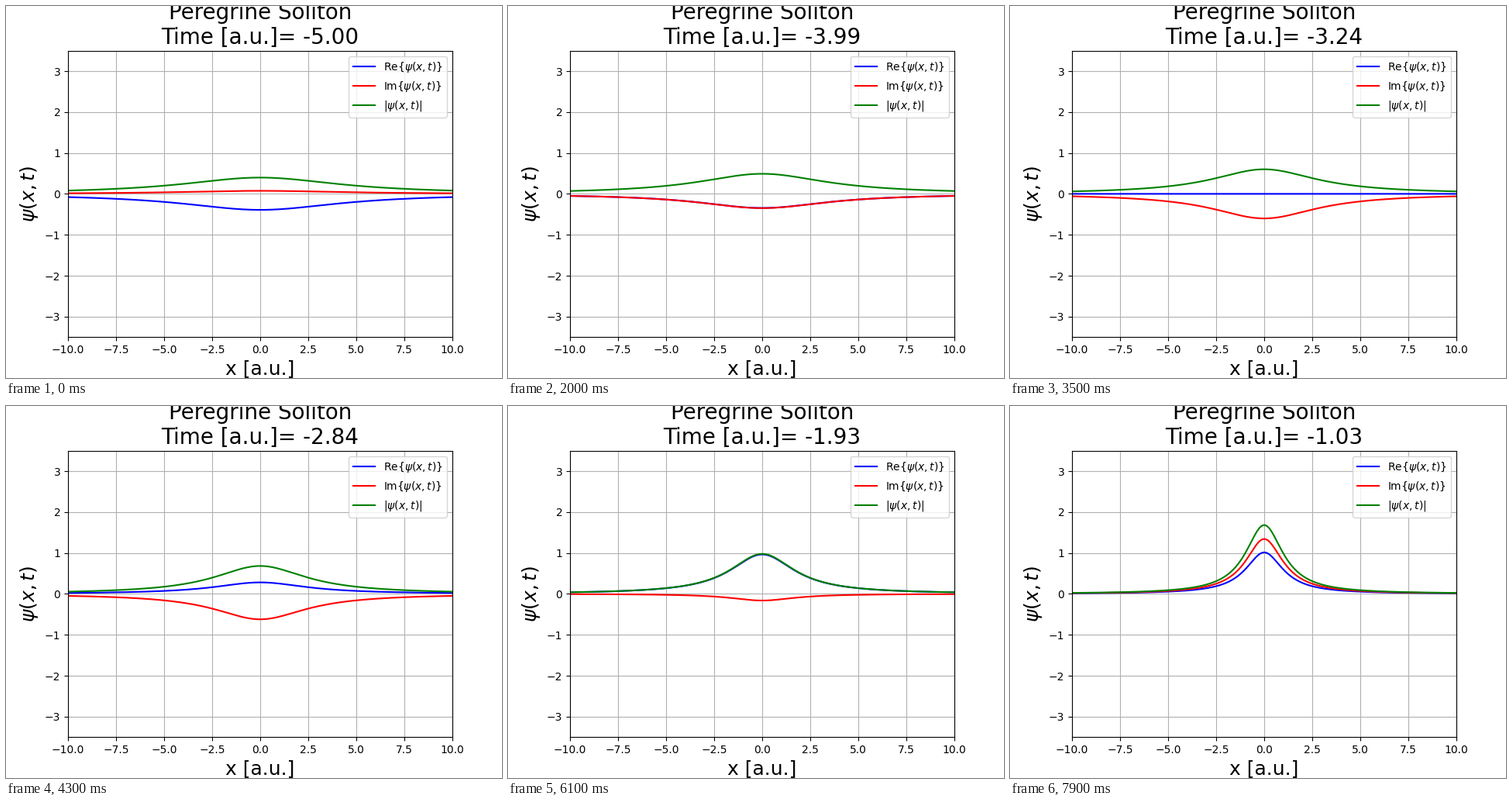
A matplotlib script for the animation above (8 s loop, 640 by 480 pixels).

```python
import numpy as np
import matplotlib.pyplot as plt
from matplotlib.animation import FuncAnimation

FRAMES = 80
times = np.linspace(-5, 5, 200)
x = np.linspace(-10, 10, 400)


def soliton(x, t):
    """Rational part of the Peregrine solution, without the background."""
    return -4 * (1 + 2j * t) / (1 + 4 * x**2 + 4 * t**2) * np.exp(1j * t)


fig, ax = plt.subplots(figsize=(6.4, 4.8), dpi=100)
ax.set_xlim(-10, 10)
ax.set_ylim(-3.5, 3.5)
ax.grid(True)
ax.set_xlabel("x [a.u.]", fontsize=18)
ax.set_ylabel(r"$\psi(x,t)$", fontsize=18)
title = ax.set_title("", fontsize=20)

parts = [
    (np.real, "blue", r"Re{$\psi(x,t)$}"),
    (np.imag, "red", r"Im{$\psi(x,t)$}"),
    (np.abs, "green", r"$|\psi(x,t)|$"),
]
lines = [ax.plot([], [], color=c, label=name)[0] for _, c, name in parts]
ax.legend(loc="upper right")


def update(i):
    # The curves trail the clock by one time step.
    psi = soliton(x, times[max(i - 1, 0)])
    for line, (part, _, _) in zip(lines, parts):
        line.set_data(x, part(psi))
    title.set_text(f"Peregrine Soliton\nTime [a.u.]= {times[i]:.2f}")
    return [*lines, title]


anim = FuncAnimation(fig, update, frames=FRAMES, interval=100,
                     repeat=True, repeat_delay=0, blit=False)
plt.show()
```
